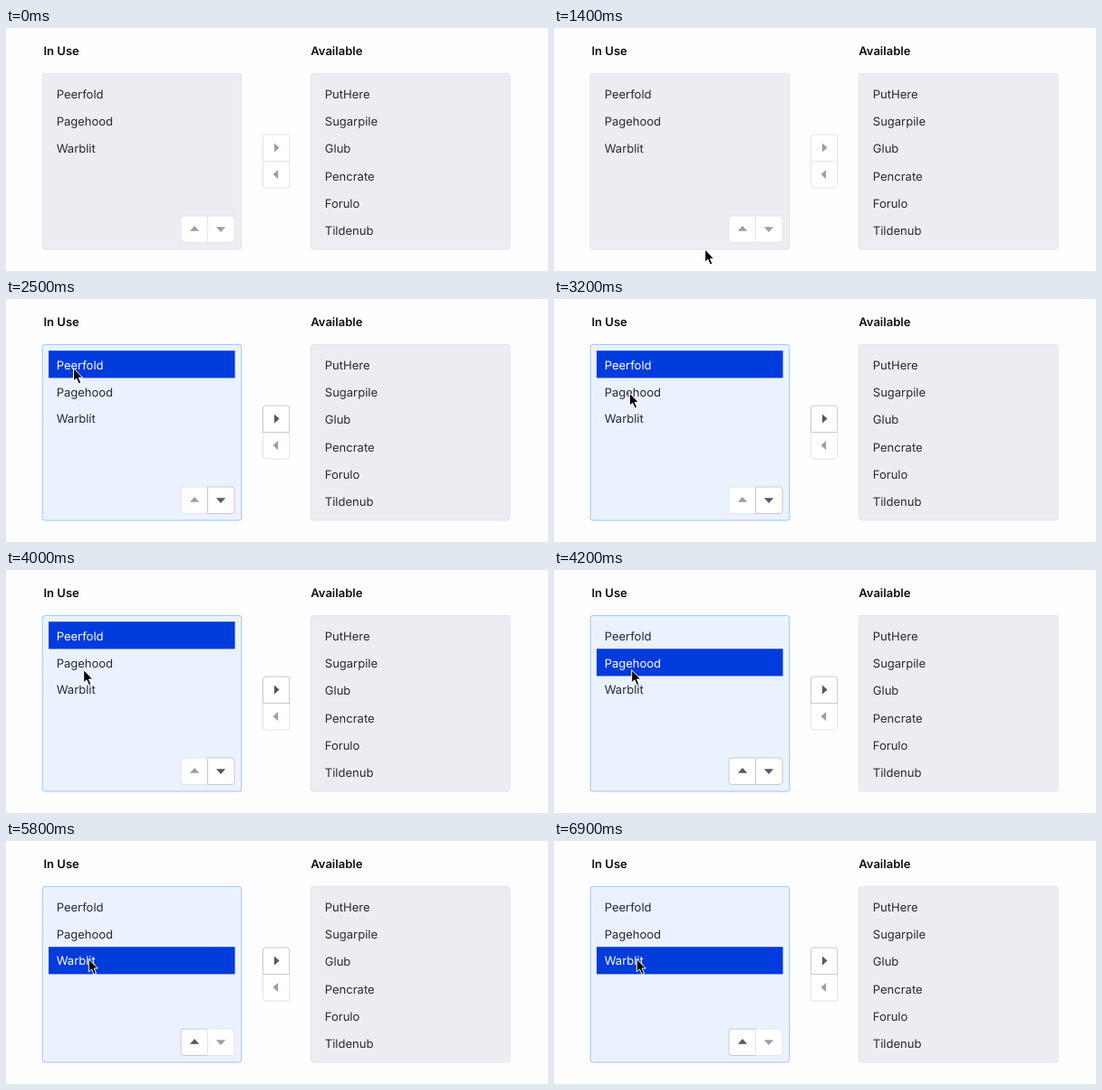
An HTML page for the animation above (7700 ms loop, 598 by 269 pixels).

```html
<!DOCTYPE html>
<html lang="en">
<head>
<meta charset="utf-8">
<title>Dual list box</title>
<style>
  html, body { margin: 0; width: 100%; height: 100%; overflow: hidden; background: #fefdff; }
  svg { display: block; width: 598px; height: 269px; }
  text { font: 13px Inter, sans-serif; fill: #272833; text-rendering: geometricPrecision; }
  .head { font-weight: 600; fill: #0c0c14; }
  .panel { fill: #ecedf2; stroke: #e2e3e9; }
  .panel.active { fill: #ebf2ff; stroke: #9cc5f7; }
  .mark { fill: #003bdb; }
  .row.on { fill: #fff; }
  .btn path { fill: #fff; stroke: #e3e4eb; }
  .btn .icon { fill: #9b9daf; stroke: none; }
  .btn.on path { stroke: #c6c8d3; }
  .btn.on .icon { fill: #565869; stroke: none; }
</style>
</head>
<body>
<svg id="stage" viewBox="0 0 598 269"></svg>
<script>
const LOOP = 7700;
const inUse = ["Peerfold", "Pagehood", "Warblit"];
const available = ["PutHere", "Sugarpile", "Glub", "Pencrate", "Forulo", "Tildenub"];

// Selection over time: [start, row]
const picks = [[0, -1], [2500, 0], [4200, 1], [5800, 2]];

// Pointer moves: [start, end, x, y]
const moves = [
  [1400, 2100, 74.5, 76.7],
  [2800, 3400, 86.5, 113.5],
  [3600, 4000, 85.7, 110.5],
  [4600, 5400, 91.3, 131],
  [5400, 5500, 91.3, 130.6]
];

const stage = document.getElementById("stage");

function add(tag, attrs, parent = stage) {
  const el = document.createElementNS("http://www.w3.org/2000/svg", tag);
  for (const key in attrs) el.setAttribute(key, attrs[key]);
  parent.append(el);
  return el;
}

function label(str, x, y, cls) {
  const el = add("text", { x, y, class: cls });
  el.textContent = str;
  return el;
}

const panel = x => add("rect", { x, y: 50.4, width: 219.6, height: 194.6, rx: 3, class: "panel" });
const rowY = (i, pitch) => 77.8 + i * pitch;

function button(frame, icon) {
  const g = add("g", { class: "btn" });
  add("path", { d: frame }, g);
  add("path", { d: icon, class: "icon" }, g);
  return g;
}

label("In Use", 41.5, 29.6, "head");
label("Available", 336.3, 29.6, "head");
const leftPanel = panel(40.2);
panel(336.4);
const mark = add("rect", { x: 47, width: 205.6, height: 30.2, class: "mark" });
const rows = inUse.map((name, i) => label(name, 55.7, rowY(i, 30.3), "row"));
available.forEach((name, i) => label(name, 351.8, rowY(i, 30.3), "row"));

const up = button("M222.5 208H196q-3 0-3 3v23.5q0 3 3 3h26.5z", "M202.8 224.8h10.4l-5.2-5.8z");
const down = button("M222.5 208H249q3 0 3 3v23.5q0 3-3 3h-26.5z", "M231.8 220.2h10.4l-5.2 5.8z");
const left = button("M283.5 147.5H312.7V174q0 3-3 3h-23.2q-3 0-3-3z", "M300.2 157v10.2l-5.6-5.1z");
const right = button("M283.5 147.5H312.7V121q0-3-3-3h-23.2q-3 0-3 3z", "M296 127.4v10.2l5.6-5.1z");

const pointer = add("path", {
  d: "M0 0V14.2L3.2 11.3 5.7 17 8.2 15.9 5.8 10.4H10z",
  fill: "#000", stroke: "#fff", "stroke-width": 1, "stroke-linejoin": "round"
});

function pointerAt(t) {
  let x = 166.6, y = 245;
  for (const [start, end, toX, toY] of moves) {
    const p = Math.min(1, Math.max(0, (t - start) / (end - start)));
    const k = p * p * (3 - 2 * p);
    x += (toX - x) * k;
    y += (toY - y) * k;
  }
  return [x, y];
}

function draw(now) {
  const t = Math.floor(now % LOOP / 100) * 100;
  const pick = picks.findLast(([start]) => t >= start)[1];
  const active = pick >= 0;

  leftPanel.classList.toggle("active", active);
  mark.style.display = active ? "" : "none";
  mark.setAttribute("y", 57.2 + pick * 30);
  rows.forEach((row, i) => {
    row.classList.toggle("on", i === pick);
    row.setAttribute("y", rowY(i, active ? 29.75 : 30.3));
  });

  up.classList.toggle("on", pick > 0);
  down.classList.toggle("on", active && pick < rows.length - 1);
  right.classList.toggle("on", active);

  pointer.style.display = t < 1400 ? "none" : "";
  pointer.setAttribute("transform", `translate(${pointerAt(t)})`);
}

const begin = performance.now();
function tick() {
  draw(performance.now() - begin);
  requestAnimationFrame(tick);
}
tick();
</script>
</body>
</html>
```
